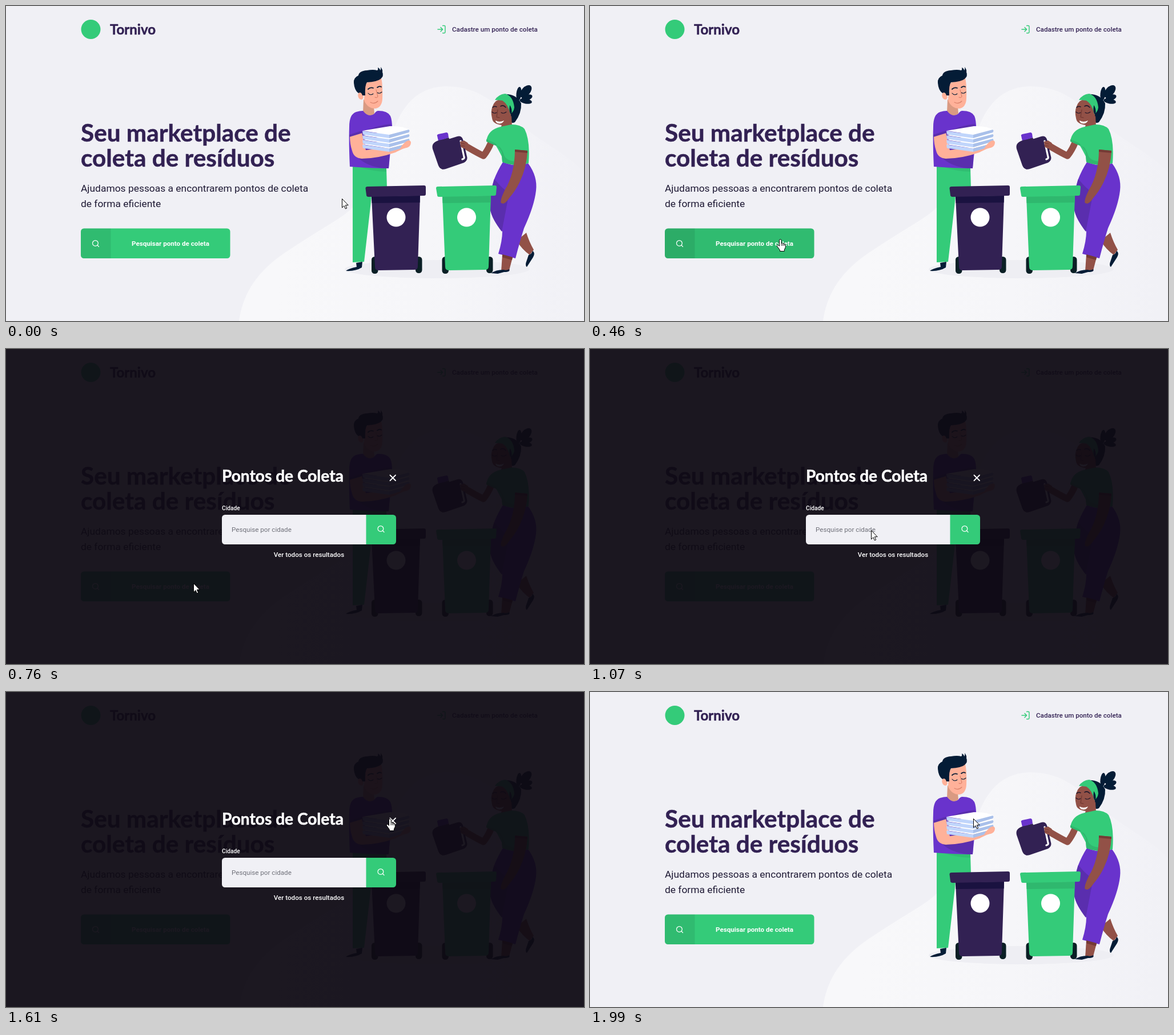
An HTML page that plays this animation: 1012x553 px, repeating every 2.92 s.

```html
<!DOCTYPE html>
<html lang="pt-BR">
<head>
<meta charset="utf-8">
<title>Pontos de coleta</title>
<style>
  html, body { margin: 0; width: 100%; height: 100%; overflow: hidden; background: #f0f0f5; }
  svg { display: block; }
  text { font-family: Roboto, sans-serif; font-size: 11.63px; }
  .head { font-family: Lato, "Open Sans", sans-serif; font-weight: 700; fill: #322153; stroke: #322153; stroke-width: .5; }
  .big { font-size: 42.3px; }
  .title { font-size: 28.1px; fill: #fff; stroke: #fff; }
  .lead { font-size: 17.42px; fill: #1f1a35; }
  .medium { font-weight: 500; }
  .white { fill: #fff; }
  .green { fill: #34cb79; }
  .greenDark { fill: #2fb86e; }
  .plum { fill: #322153; }
  .purple { fill: #6933cc; }
  .purpleDark { fill: #5a2eae; }
  .navy { fill: #041c36; }
  .skin { fill: #ffb199; }
  .brown { fill: #925147; }
  .line { fill: none; stroke-linecap: round; stroke-linejoin: round; }
</style>
</head>
<body>
<svg width="1012" height="553" viewBox="0 0 1012 553">
  <defs>
    <linearGradient id="fade" gradientUnits="userSpaceOnUse" x1="480" y1="400" x2="1000" y2="420">
      <stop offset="0" stop-color="#f8f8fa"/>
      <stop offset=".5" stop-color="#f6f6f9"/>
      <stop offset="1" stop-color="#f1f1f6"/>
    </linearGradient>
    <g id="lens" class="line" stroke="#fff" stroke-width="2">
      <circle cx="11" cy="11" r="8"/><path d="M21 21l-4.3-4.3"/>
    </g>
    <g id="sheet">
      <path fill="#fff" d="M624 219L672 211Q692 210 707 217L671 226Z"/>
      <path fill="#c0d5fb" d="M624 219.500L671 226V232L625 225.500Z"/>
      <path fill="#a9c0ea" d="M671 226L705 217Q708 219 705 222L671 232Z"/>
    </g>
  </defs>

  <rect width="1012" height="553" fill="#f0f0f5"/>
  <path fill="url(#fade)" d="M408 553C415 500 445 462 490 432C530 405 560 388 590 368C648 326 660 270 678 220C695 170 725 141 772 141C830 141 862 176 900 208C940 240 985 262 1012 292V553Z"/>
  <ellipse cx="755" cy="462" rx="162" ry="16" fill="#eeeef3"/>

  <!-- header -->
  <circle class="green" cx="148.500" cy="41" r="17"/>
  <text class="head" x="182" y="50" style="font-size:24px">Tornivo</text>
  <g class="line" stroke="#34cb79" stroke-width="2" transform="translate(753.800 32.400) scale(.72)">
    <path d="M15 3h4a2 2 0 0 1 2 2v14a2 2 0 0 1-2 2h-4M10 17l5-5-5-5M15 12H3"/>
  </g>
  <text class="medium plum" x="781" y="45">Cadastre um ponto de coleta</text>

  <!-- intro -->
  <text class="head big" x="131" y="237.500">Seu marketplace de</text>
  <text class="head big" x="131" y="282">coleta de resíduos</text>
  <text class="lead" x="131" y="326">Ajudamos pessoas a encontrarem pontos de coleta</text>
  <text class="lead" x="131" y="353">de forma eficiente</text>

  <!-- button -->
  <rect class="green" x="131" y="390.500" width="261.500" height="52.500" rx="5.500"/>
  <path fill="#000" opacity=".08" d="M183.500 390.500H136.500a5.500 5.500 0 0 0-5.500 5.500v41.500a5.500 5.500 0 0 0 5.500 5.500h47Z"/>
  <rect id="hover" x="131" y="390.500" width="261.500" height="52.500" rx="5.500" opacity="0"/>
  <use href="#lens" transform="translate(149.700 409.700) scale(.61)"/>
  <text class="white" x="288" y="420.500" text-anchor="middle" font-weight="700">Pesquisar ponto de coleta</text>

  <!-- man -->
  <g>
    <path class="green" d="M607 281L666 284L667 320L641 322Q639 345 636 370L627 449L607 450Z"/>
    <path class="greenDark" d="M607 281L666 284V291Q640 290 620 283Z" opacity=".65"/>
    <path class="navy" d="M613 451L624 449L623 459Q612 466 595 465Q600 461 614 458Z"/>
    <path fill="#d99a82" d="M626 164L625 187Q635 197 645 189L644 176Z"/>
    <path class="skin" d="M628 136L657 126Q660 140 659 163Q658 178 647 180Q633 180 627 166Z"/>
    <ellipse class="skin" cx="621" cy="158" rx="4.500" ry="6.500" transform="rotate(-18 621 158)"/>
    <path class="navy" d="M609 135Q608 126 617 122Q618 114 632 113Q643 111 650 113Q652 112 651 108Q655 110 655 113Q657 111 656 107Q660 112 659 116Q662 123 656 128Q650 133 632 134Q628 139 629 157L624 157Q622 150 617 153Q610 148 609 135Z"/>
    <g class="line" stroke="#041c36" stroke-width="1.800">
      <path d="M634 146Q638 142 643 144M650 143Q654 140 657 142"/>
      <path stroke-width="1.100" d="M634 153Q638 158 643 154M650 152Q654 155 658 151"/>
      <path stroke="#d9806a" stroke-width="1.100" d="M648 147L651 159Q649 162 646 160M638 169Q645 173 651 167"/>
    </g>
    <path class="purple" d="M613 186Q619 184 625 184Q635 197 645 189Q648 184 652 184Q668 184 673 193Q677 202 676 225L670 285Q640 285 602 282Q600 240 601 212Q601 190 613 186Z"/>
    <path class="purpleDark" d="M623 222Q650 209 674 207L670 285Q638 285 618 268L632 250Z"/>
    <path class="skin" d="M602 228L623 221Q626 240 630 253L671 247L694 240Q703 234 708 237Q710 244 703 248Q692 251 682 257Q650 268 623 268Q609 267 606 254Q602 242 602 228Z"/>
    <path class="purpleDark" d="M601 226L623 219L624 223L601 230Z"/>
    <use href="#sheet" y="24"/><use href="#sheet" y="16"/><use href="#sheet" y="8"/><use href="#sheet"/>
    <path class="skin" d="M699 239Q706 233 709 239Q709 247 701 249L690 250Q694 243 699 239Z"/>
  </g>

  <!-- woman -->
  <g>
    <path class="brown" d="M894 412L911 398Q916 414 924 428L917 437Q904 428 894 412Z"/>
    <path class="navy" d="M922 430Q928 434 921 444L912 458Q908 456 912 446L915 437Q920 436 922 430Z"/>
    <path class="brown" d="M869 436L887 441L881 464L867 466Z"/>
    <path class="navy" d="M849 469Q858 463 871 463Q876 465 881 462Q884 467 872 467L861 470Z"/>
    <path class="purple" d="M870 274Q895 284 914 276Q931 299 928 324Q925 351 907 390Q900 412 892 443L862 435Q869 412 869 396Q851 374 848 358Q846 330 854 306Q861 288 870 274Z"/>
    <path class="purpleDark" d="M855 304Q870 322 881 328L868 396Q851 374 848 358Q846 330 855 304Z"/>
    <g class="navy">
      <path d="M870 155Q893 153 902 171Q903 188 891 204Q884 208 880 198L876 170Z"/>
      <ellipse cx="910" cy="150" rx="13" ry="7.500" transform="rotate(-48 910 150)"/>
      <ellipse cx="912" cy="161" rx="10" ry="5" transform="rotate(-20 912 161)"/>
      <ellipse cx="910" cy="167" rx="11" ry="4.500" transform="rotate(10 910 167)"/>
      <ellipse cx="898" cy="154" rx="4.500" ry="12" transform="rotate(6 898 154)"/>
    </g>
    <path class="brown" d="M869 204L885 193L886 211Q878 217 867 212Z"/>
    <path class="brown" d="M852 176Q856 164 869 163Q882 169 884 186Q886 207 868 209Q852 207 851 197Q848 185 852 176Z"/>
    <path class="green" d="M856 165Q862 155 874 154Q888 158 890 178Q889 186 883 190Q879 172 869 166Q861 165 856 165Z"/>
    <path class="navy" d="M882 174Q887 180 885 191Q880 188 882 174Z"/>
    <path class="white" d="M857 201Q864 205 872 201Q869 208 861 206Q857 204 857 201Z"/>
    <g class="line" stroke="#21182b" stroke-width="1.500">
      <path d="M852 178Q855 175 859 177M866 176Q871 173 875 178"/>
      <path stroke-width="1.100" d="M851 186Q855 190 859 187M867 187Q871 190 876 186"/>
      <path stroke="#6d352f" stroke-width="1.100" d="M861 182L859 195L864 196"/>
    </g>
    <path class="line" stroke="#925147" stroke-width="11.500" d="M850 238Q844 253 836 263Q827 259 805 246"/>
    <path class="brown" d="M794 239L802 236Q812 242 812 251Q802 253 796 247Z"/>
    <path class="green" d="M866 212L885 208Q901 208 908 216Q918 236 915 276Q895 283 869 274L868 264Q861 250 857 244L841 237Q844 217 866 212Z"/>
    <path class="greenDark" d="M841 234L857 241L868 256L869 274Q882 279 894 279L893 273Q876 272 872 262Q867 244 857 245L841 238Z"/>
    <path class="brown" d="M891 252L913 254Q912 283 899 310Q891 326 881 337Q874 348 867 346Q864 343 873 324Q891 294 891 252Z"/>
    <path fill="#743a35" d="M891 252L913 254V258L891 256Z"/>
    <path fill="#743a35" d="M869 436L887 441L886 446L869 441Z"/>
    <path class="line" stroke="#743a35" d="M879 329L869 341M883 331L873 343"/>
  </g>

  <!-- jug -->
  <g>
    <path class="plum" d="M757 236L775 231L778 237L757 242Z"/>
    <path class="purple" d="M755 228Q754 226 757 225L771 222Q773 222 774 224L775 231L757 237Z"/>
    <path class="plum" d="M751 239Q758 234 774 234L790 229Q797 227 800 234L807 264Q809 271 802 275L770 286Q761 289 757 280L747 251Q745 243 751 239Z"/>
    <path class="line" stroke="#fff" stroke-width="3.200" d="M796 237L802 265Q803 268 799 269"/>
    <path class="brown" d="M795 238Q803 235 809 241L809 250Q802 252 796 247Z"/>
    <path class="line" stroke="#743a35" d="M797 241L803 242M797 245L803 246"/>
  </g>

  <!-- bins -->
  <g fill="#0a1f25">
    <rect x="640" y="440" width="11.500" height="30" rx="5.500"/>
    <rect x="717" y="440" width="11.500" height="29" rx="5.500"/>
    <rect x="763.500" y="440" width="11.500" height="30" rx="5.500"/>
    <rect x="841" y="440" width="11.500" height="29" rx="5.500"/>
  </g>
  <path class="plum" d="M640 334L725 333L721 457Q721 463 715 463L653 464Q646 464 646 458Z"/>
  <path fill="#1a1240" d="M640 334L725 333L724.700 345L640.600 346Z"/>
  <path class="plum" d="M633 317L732 315Q735 315 735 318V330Q735 333 732 333L635 335Q631 335 631 332L629.500 320Q629.500 317 633 317Z"/>
  <path class="green" d="M764 334L849 333L845 457Q845 463 839 463L776 464Q769 464 769 458Z"/>
  <path class="greenDark" d="M764 334L849 333L848.600 345L764.600 346Z"/>
  <path class="green" d="M756 317L856 315Q859 315 859 318L858 330Q858 333 855 333L758 335Q755 335 755 332L753 320Q753 317 756 317Z"/>
  <circle class="white" cx="683" cy="371" r="16.500"/>
  <circle class="white" cx="806.500" cy="371" r="16.500"/>

  <path class="brown" d="M876 318L886 328Q877 346 870 347Q864 345 870 331Z"/>

  <!-- search dialog -->
  <g id="modal" visibility="hidden">
    <rect width="1012" height="553" fill="#0e0a14" opacity=".94"/>
    <text class="head title" x="378" y="233">Pontos de Coleta</text>
    <path class="line" stroke="#fff" stroke-width="1.800" d="M672.500 221.500l9.500 9.500m0-9.500l-9.500 9.500"/>
    <text class="white medium" x="378" y="283" style="font-size:10.2px">Cidade</text>
    <rect class="green" x="600" y="291" width="83" height="52" rx="5.500"/>
    <path fill="#f0f0f5" d="M630.500 291H383.500a5.500 5.500 0 0 0-5.500 5.500v41a5.500 5.500 0 0 0 5.500 5.500h247Z"/>
    <text x="395" y="320.500" fill="#6f7079">Pesquise por cidade</text>
    <use href="#lens" transform="translate(649.200 308.700) scale(.61)"/>
    <text class="white medium" x="530.500" y="365" text-anchor="middle">Ver todos os resultados</text>
  </g>

  <!-- pointer -->
  <g id="pointer" stroke="#000" fill="#fff" stroke-linejoin="round">
    <circle id="dot" r="11" fill="#f0e600" opacity=".54" stroke="none"/>
    <path id="arrow" d="M.5 .5V16L4 12.700L6.400 18L8.700 17L6.400 11.700H11.200Z"/>
    <g id="hand" transform="translate(1.500 .5)">
      <path d="M-2 12V2a1.800 1.800 0 0 1 3.600 0V7q1.600-.9 2.600 .6 1.600-.6 2.400 .8 2.200-.4 2.200 2v3.600l-2 4.500v2.500H-1v-2l-4.800-6.600q-1-2 .6-2.400 1.400-.2 3.200 2z"/>
      <path fill="none" stroke-width=".9" d="M1.600 7v4.500M4.200 8v3.500M6.600 8.600v3"/>
    </g>
  </g>
</svg>
<script>
const LOOP = 2920;
const OPEN = 760, CLOSE = 1990;
const BUTTON_EDGE = 392, CLOSE_EDGE = 669;

// time, x, y of the pointer
const moves = [
  [0, 588, 338], [70, 566, 344], [150, 498, 362], [220, 432, 380],
  [300, 383, 392], [380, 350, 403], [450, 332, 409], [530, 327, 411],
  [OPEN, 328, 411], [920, 345, 402], [990, 404, 369], [1070, 492, 318],
  [1150, 578, 269], [1220, 634, 236], [1300, 660, 223], [1380, 661, 222],
  [1460, 664, 222], [1530, 668, 222], [1610, 671, 222]
];
const clicks = [[610, OPEN], [1910, CLOSE]];
const hoverSteps = [[0, 0], [380, .045], [450, .08], [530, .09], [OPEN, 0]];

const el = id => document.getElementById(id);
const [modal, pointer, dot, arrow, hand, hover] =
  ["modal", "pointer", "dot", "arrow", "hand", "hover"].map(el);
const show = (node, on) => node.setAttribute("visibility", on ? "visible" : "hidden");
const stepAt = (steps, t) => steps.findLast(s => s[0] <= t);

function draw(now) {
  const t = now % LOOP;
  const open = t >= OPEN && t < CLOSE;
  const [, x, y] = stepAt(moves, t);
  const onLink = t < OPEN ? x < BUTTON_EDGE : open && x > CLOSE_EDGE;

  show(modal, open);
  show(hand, onLink);
  show(arrow, !onLink);
  show(dot, clicks.some(([from, to]) => t >= from && t < to));
  hover.setAttribute("opacity", stepAt(hoverSteps, t)[1]);
  pointer.setAttribute("transform", `translate(${x} ${y})`);
}

function tick() {
  draw(performance.now());
  requestAnimationFrame(tick);
}
tick();
</script>
</body>
</html>
```
